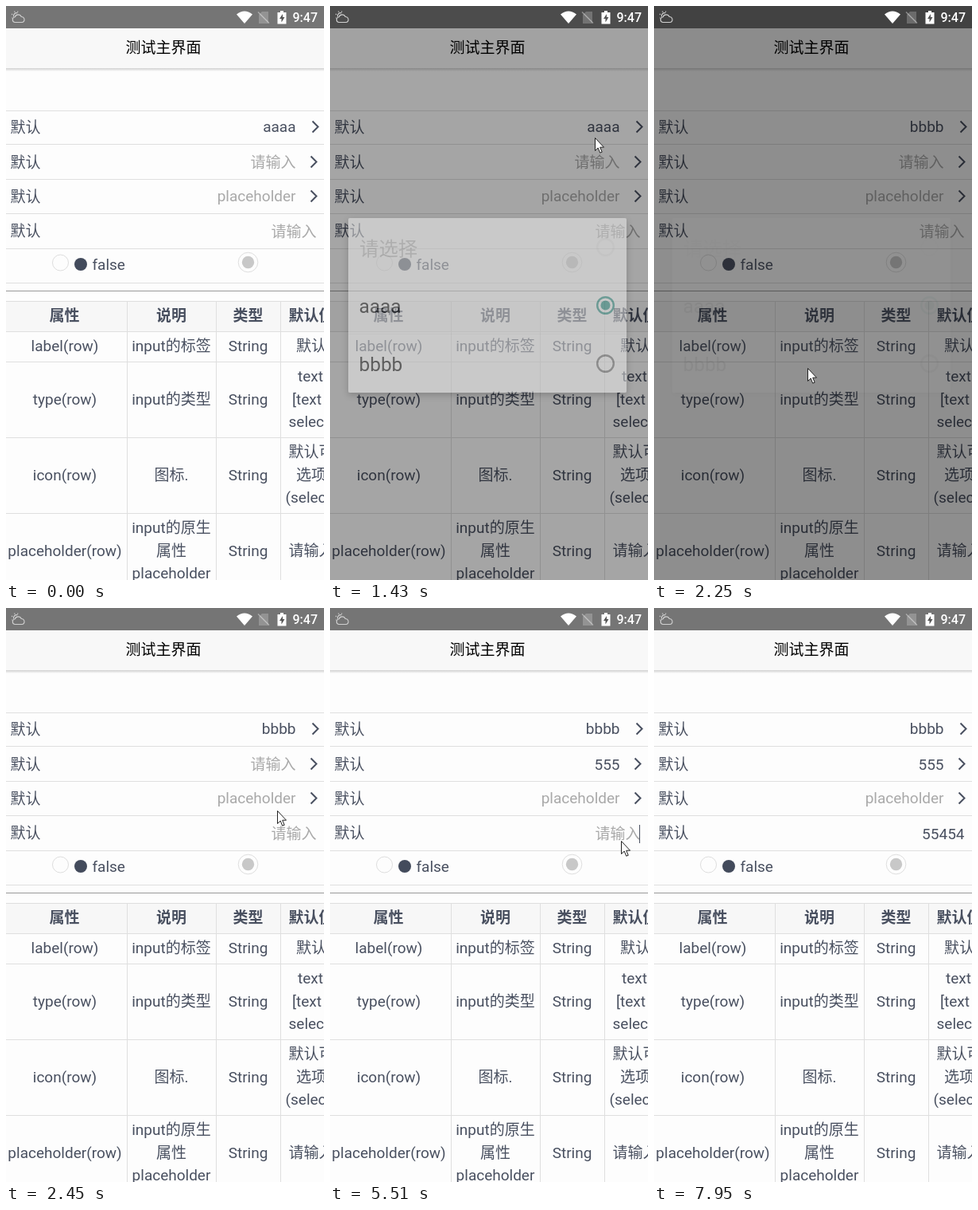
Animation of 400 by 720 pixels, one loop 8 s. Source, as an HTML page:

```html
<!DOCTYPE html>
<html lang="zh-CN">
<head>
<meta charset="utf-8">
<title>表单测试</title>
<style>
  html, body { margin: 0; width: 100%; height: 100%; overflow: hidden; background: #fdfdfd; }
  svg { display: block; width: 400px; height: 720px; }
  text { font: 19px Roboto, "Noto Sans CJK SC", "Noto Sans CJK", sans-serif; fill: #495060; white-space: pre; }
  .mid { text-anchor: middle; }
  .end { text-anchor: end; }
  .bold text { font-weight: 700; }
  .hint { fill: #a9a9a9; }
  .rule { stroke: #dfdfdf; fill: none; shape-rendering: crispEdges; }
  .chevron { stroke: #495060; stroke-width: 2; fill: none; }
  .ring { fill: none; stroke: #dedede; }
  #dialog text { font-size: 24.4px; fill: #1c1c1c; }
  #dialog .off { fill: #b8b8b8; }
  #dialog circle { fill: none; stroke-width: 2.4; }
  .caret { stroke: #495060; shape-rendering: crispEdges; }
</style>
</head>
<body>
<svg viewBox="0 0 400 720">
  <defs>
    <linearGradient id="shade" x2="0" y2="1">
      <stop offset="0" stop-color="#000" stop-opacity=".18"/>
      <stop offset="1" stop-color="#000" stop-opacity="0"/>
    </linearGradient>
    <filter id="lift" x="-10%" y="-10%" width="120%" height="125%">
      <feDropShadow dx="0" dy="3" stdDeviation="4" flood-opacity=".4"/>
    </filter>
    <path id="chev" class="chevron" d="M0 0l7 7-7 7"/>
  </defs>

  <rect width="400" height="720" fill="#fdfdfd"/>
  <rect width="400" height="28" fill="#757575"/>
  <rect y="28" width="400" height="50" fill="#f8f8f8"/>
  <rect y="78" width="400" height="4" fill="url(#shade)"/>
  <text class="mid" x="198" y="59" style="fill:#000">测试主界面</text>

  <!-- form -->
  <path class="rule" d="M0 131.5H400M0 173.5H400M0 217.5H400M0 260.5H400M0 304.5H400M0 347.5H400"/>
  <text x="5.5" y="158.5">默认</text>
  <text x="5.5" y="202.5">默认</text>
  <text x="5.5" y="245.5">默认</text>
  <text x="5.5" y="288.5">默认</text>
  <text id="choice" class="end" x="364.5" y="158"></text>
  <text id="second" class="end" x="364.5" y="202.5"></text>
  <text class="end hint" x="364.5" y="245">placeholder</text>
  <text id="fourth" class="end" x="390.5" y="289.5"></text>
  <use href="#chev" x="385.5" y="144.5"/>
  <use href="#chev" x="383.5" y="188.5"/>
  <use href="#chev" x="383.5" y="231.5"/>
  <path id="caret2" class="caret" d="M363.5 186V209"/>
  <path id="caret4" class="caret" d="M389.5 272V295"/>
  <circle class="ring" cx="68.5" cy="322" r="10"/>
  <circle cx="94" cy="324" r="8" fill="#434b5c"/>
  <text x="108.5" y="330.5">false</text>
  <circle class="ring" cx="304.5" cy="321.5" r="12.3"/>
  <circle cx="304.5" cy="321.5" r="7.7" fill="#c8c8c8"/>
  <path d="M0 357.5H400" stroke="#999" shape-rendering="crispEdges"/>

  <!-- table -->
  <rect y="370" width="400" height="38" fill="#f7f7f7"/>
  <path class="rule" d="M0 370.5H400M0 408.5H400M0 446.5H400M0 541.5H400M0 636.5H400M152.5 370V720M264.5 370V720M345.5 370V720"/>
  <g class="bold">
    <text class="mid" x="73.5" y="395">属性</text>
    <text class="mid" x="208" y="395">说明</text>
    <text class="mid" x="304.5" y="395">类型</text>
    <text x="355.5" y="395">默认值</text>
  </g>
  <g class="mid">
    <text x="74" y="432.5">label(row)</text>
    <text x="208" y="432.5">input的标签</text>
    <text x="304.5" y="432.5">String</text>
    <text x="74" y="499.5">type(row)</text>
    <text x="208" y="499.5">input的类型</text>
    <text x="304.5" y="499.5">String</text>
    <text x="74" y="594.5">icon(row)</text>
    <text x="208" y="594.5">图标.</text>
    <text x="304.5" y="594.5">String</text>
    <text x="74" y="689.5">placeholder(row)</text>
    <text x="208" y="661">input的原生</text>
    <text x="208" y="689.5">属性</text>
    <text x="208" y="717.5">placeholder</text>
    <text x="304.5" y="689.5">String</text>
  </g>
  <text x="365" y="432.5">默认</text>
  <text x="367" y="471">text</text>
  <text x="360" y="499.5">[text</text>
  <text x="355.5" y="527.5">select]</text>
  <text x="355.5" y="566">默认可</text>
  <text x="365" y="594.5">选项</text>
  <text x="351.5" y="622.5">(select)</text>
  <text x="355.5" y="689.5">请输入</text>

  <rect id="dim" width="400" height="720"/>

  <g id="dialog">
    <rect x="23" y="266" width="350" height="219" rx="2" fill="#eee" filter="url(#lift)"/>
    <path d="M23 411.5H373" stroke="#e4e4e4" shape-rendering="crispEdges"/>
    <text class="off" x="37" y="313">请选择</text>
    <text x="36.5" y="385">aaaa</text>
    <text x="36.5" y="458">bbbb</text>
    <circle cx="346.5" cy="302.5" r="10.3" stroke="#e3e3e3"/>
    <circle cx="346.5" cy="375.5" r="10.3" stroke="#379488"/>
    <circle cx="346.5" cy="375.5" r="6" style="fill:#379488"/>
    <circle cx="346.5" cy="448.5" r="10.3" stroke="#757575"/>
  </g>

  <!-- status icons stay above the dimming -->
  <g fill="none" stroke="#d0d0d0" stroke-width="1.1">
    <path d="M11 20.5a3.4 3.4 0 0 1 .3-6.700a4.300 4.300 0 0 1 8-.3a3.500 3.500 0 0 1 .5 7zM9.500 13.500a4 4 0 0 1 5-4.700"/>
    <path d="M7 10l1.200.7M10.500 6.500l.7 1.200M15 6.500l-.5 1.200M7 15h.8"/>
  </g>
  <path d="M290 10.500Q300 2.500 310 10.500L300 22z" fill="#fff"/>
  <path d="M322 7h8v15h-12V11z" fill="#fff" opacity=".22"/>
  <path d="M317 7.500L331 21.500" stroke="#fff" stroke-width="1.400" opacity=".4"/>
  <path d="M345 6h4v2h3.500v14.500h-11V8h3.500z" fill="#fff"/>
  <path d="M348 10l-4 6h2.500v4.500l4-6.500H348z" fill="#555"/>
  <text class="end" x="392" y="20" style="font-size:16px;font-weight:500;fill:#fff">9:47</text>

  <path id="cursor" d="M.5.5V16.500L4.200 13 6.700 19.200 9.200 18.200 6.700 12.200H11.500z" fill="#fff" stroke="#222"/>
</svg>
<script>
  const LOOP = 8000;
  const $ = id => document.getElementById(id);

  // Each track lists [start time, value]; a value holds until the next one.
  const tracks = {
    cursor: [[0, null], [200, [300, 482]], [400, [290, 425]], [600, [283, 366]],
      [800, [300, 280]], [1030, [322, 205]], [1230, [333, 165]], [1630, [300, 240]],
      [1830, [235, 370]], [2050, [192, 454]], [2250, [193, 454]], [2450, [341, 254]],
      [2650, [330, 238]], [2850, [311, 212]], [3050, [315, 204]], [4710, [330, 235]],
      [4910, [352, 270]], [5110, [366, 292]], [7550, null]],
    dim: [[0, 0], [1430, .35], [1630, .6], [2250, .44], [2450, 0]],
    dialog: [[0, 0], [1430, .5], [1630, 1], [2250, .03], [2450, 0]],
    choice: [[0, 'aaaa'], [2250, 'bbbb']],
    second: [[0, ''], [4090, '5'], [4290, '55'], [4490, '555']],
    fourth: [[0, ''], [6310, '5'], [6510, '55'], [6930, '554'], [7150, '5545'], [7350, '55454']],
    caret2: [[0, 0], [3270, 1], [3670, 0], [4090, 1], [5310, 0]],
    caret4: [[0, 0], [5510, 1], [5910, 0], [6310, 1], [7950, 0]]
  };

  const at = (name, t) => tracks[name].findLast(cue => cue[0] <= t)[1];

  function setField(id, value) {
    $(id).textContent = value || '请输入';
    $(id).classList.toggle('hint', !value);
  }

  function draw(now) {
    const t = Math.max(0, now) % LOOP;
    for (const id of ['dim', 'dialog', 'caret2', 'caret4']) $(id).style.opacity = at(id, t);
    for (const id of ['choice', 'second', 'fourth']) setField(id, at(id, t));
    const pos = at('cursor', t);
    $('cursor').style.opacity = pos ? 1 : 0;
    if (pos) $('cursor').setAttribute('transform', `translate(${pos})`);
  }

  const start = performance.now();
  function tick() {
    draw(performance.now() - start);
    requestAnimationFrame(tick);
  }
  tick();
</script>
</body>
</html>
```
